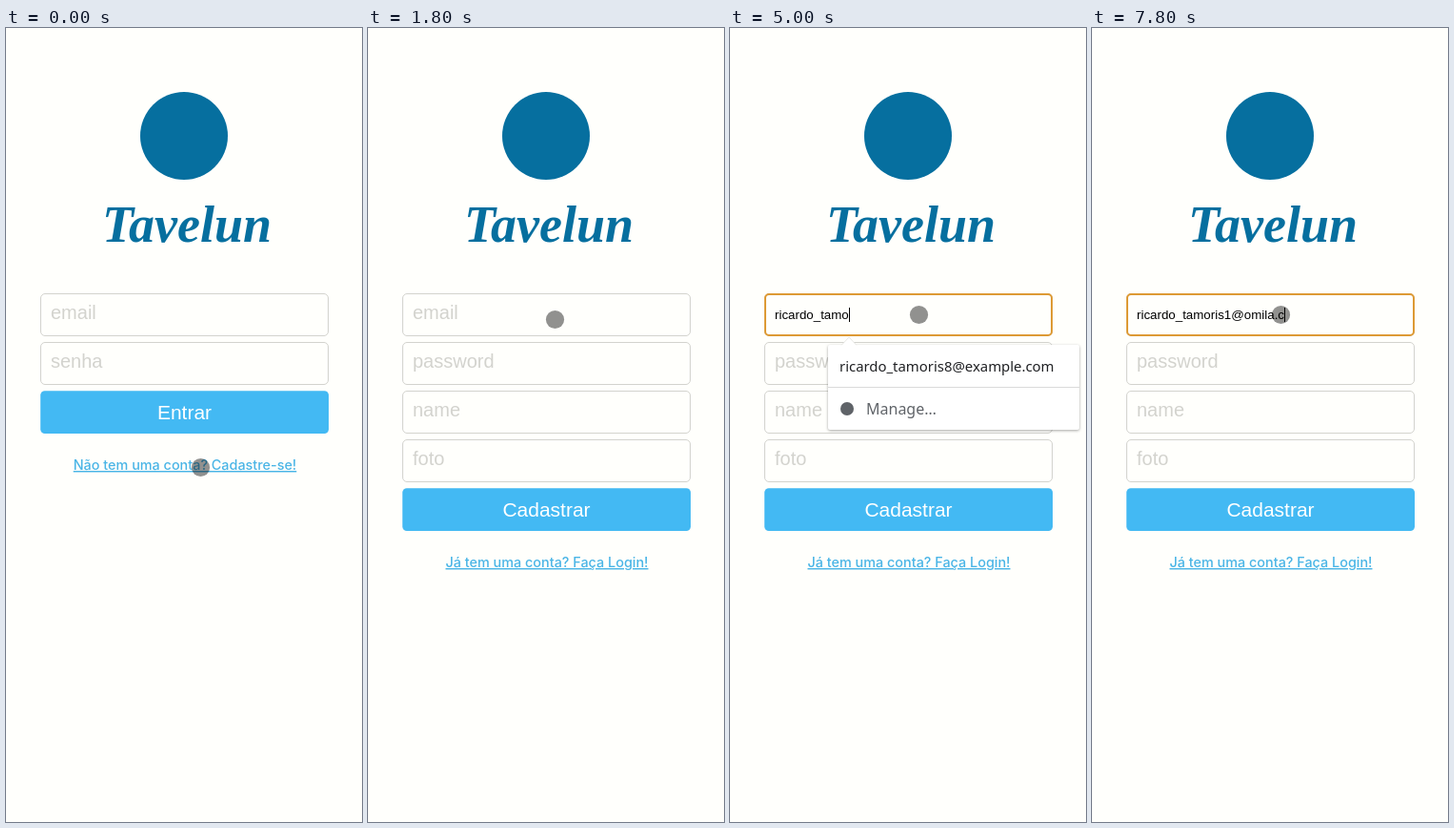
An HTML page for the animation above (8000 ms loop, 374 px wide and 832 px high).

```html
<!DOCTYPE html>
<html lang="pt-BR">
<head>
<meta charset="utf-8">
<style>
  html, body { margin: 0; width: 100%; height: 100%; overflow: hidden; background: #fffffc; }
  svg { display: block; width: 100%; height: 100%; }
  text { font-family: "Liberation Sans", Arial, sans-serif; }
  .brand { font: italic bold 54px "Liberation Serif", serif; fill: #066f9f; }
  .field rect { fill: #fffffc; stroke: #d3d3ce; }
  .field text, #hint { font-size: 20px; fill: #d3d3ce; }
  .button rect { fill: #43b9f3; }
  .button text { font-size: 21px; fill: #fff; }
  .link { font: 500 14.4px Inter, sans-serif; fill: #4ab5e6; text-decoration: underline; }
  .middle { text-anchor: middle; }
  #typed { font-size: 13.333px; fill: #000; white-space: pre; }
  #popup text { font-family: "Noto Sans", "Open Sans", sans-serif; }
  #popup > rect { filter: drop-shadow(0 1px 1.5px rgba(0, 0, 0, .35)); }
</style>
</head>
<body>
<svg viewBox="0 0 374 832">
  <circle cx="187" cy="113" r="46" fill="#066f9f"/>
  <text class="brand middle" x="190" y="224">Tavelun</text>

  <g id="login"></g>
  <g id="signup"></g>

  <g id="focus">
    <rect x="37" y="279" width="301" height="43" rx="4" fill="#fffffc" stroke="#dd9a35" stroke-width="2"/>
    <text id="hint" x="47" y="305">email</text>
    <text id="typed" x="47" y="305"></text>
    <rect id="caret" y="293" width="1" height="15"/>
  </g>

  <g id="popup">
    <rect x="103" y="332" width="264" height="89" rx="2" fill="#fff"/>
    <path d="M117 332.5L125 324L133 332.5" fill="#fff" stroke="#e2e2df" stroke-width=".8"/>
    <path d="M117.5 333H132.5" stroke="#fff" stroke-width="2"/>
    <path d="M103 376.5H367" stroke="#dadada"/>
    <text x="115" y="360" font-size="14.9" fill="#202124">ricardo_tamoris8@example.com</text>
    <circle cx="123" cy="399" r="7" fill="#5f6368"/>
    <text x="143" y="405" font-size="16" fill="#5f6368">Manage…</text>
  </g>

  <circle id="pointer" r="9.6" fill="#000" fill-opacity=".43"/>
  <g id="mover" transform="translate(198 300)" stroke="#fff" stroke-width=".6"></g>
</svg>

<script>
const LOOP = 8000, STEP = 100;
const SIGNUP_AT = 900, FOCUS_AT = 2200, POPUP_END = 6100, SHIFT_LENGTH = 300;
const $ = id => document.getElementById(id);
const show = (id, visible) => $(id).setAttribute('display', visible ? 'inline' : 'none');
const clamp = v => Math.min(1, Math.max(0, v));
const progress = (t, from, to) => from === to ? +(t >= from) : clamp((t - from) / (to - from));

// Each burst is typed at an even pace, its first key at `from` and its last at `to`.
const bursts = [
  { text: 'ricardo', from: 3000, to: 3600 },
  { text: '_', from: 4200, to: 4200 },
  { text: 'tamoris', from: 4600, to: 5400 },
  { text: '1', from: 6000, to: 6000 },
  { text: '@o', from: 6400, to: 6600 },
  { text: 'mila.c', from: 7300, to: 7800 }
];
const shiftPresses = [4100, 6200];

const origin = { x: 204.5, y: 460.5 };
const glides = [
  { from: 0, to: 400, x: 200, y: 461.5 },
  { from: 900, to: 1100, x: 197.5, y: 456.5 },
  { from: 1200, to: 1400, x: 179, y: 370.5 },
  { from: 1500, to: 1800, x: 196.5, y: 305.5 },
  { from: 2100, to: FOCUS_AT, x: 198.5, y: 300.5 }
];

function typedAt(t) {
  let text = '', lastKey = t;
  for (const burst of bursts.filter(b => t >= b.from)) {
    const p = progress(t, burst.from, burst.to);
    text += burst.text.slice(0, 1 + Math.floor(p * (burst.text.length - 1) + 1e-6));
    lastKey = Math.min(t, burst.to);
  }
  return { text, idle: t - lastKey };
}

function pointerAt(t) {
  return glides.reduce((pos, glide) => {
    const p = progress(t, glide.from, glide.to);
    return { x: pos.x + (glide.x - pos.x) * p, y: pos.y + (glide.y - pos.y) * p };
  }, origin);
}

function buildForm(id, labels, action, link) {
  const fields = labels.map((label, i) => `<g class="field" transform="translate(36 ${278 + 51 * i})">
    <rect x=".5" y=".5" width="302" height="44" rx="4.5"/><text x="11" y="27">${label}</text></g>`);
  const top = 278 + 51 * labels.length;
  $(id).innerHTML = `${fields.join('')}
    <g class="button"><rect x="36.2" y="${top + .2}" width="302.8" height="44.8" rx="4.6"/>
    <text class="middle" x="187.5" y="${top + 30}">${action}</text></g>
    <text class="link middle" x="188" y="${top + 83}">${link}</text>`;
}

function draw(t) {
  const shiftHeld = shiftPresses.some(at => t >= at && t < at + SHIFT_LENGTH);
  const { text, idle } = typedAt(t);

  show('login', t < SIGNUP_AT);
  show('signup', t >= SIGNUP_AT);
  show('focus', t >= FOCUS_AT);
  show('popup', t >= FOCUS_AT && t < POPUP_END);

  $('typed').textContent = text;
  show('hint', !text);
  show('caret', shiftHeld || idle % 1000 < 500);
  const width = text ? $('typed').getComputedTextLength() : 0;
  $('caret').setAttribute('x', Math.round(47 + width));

  const { x, y } = pointerAt(t);
  $('pointer').setAttribute('cx', x);
  $('pointer').setAttribute('cy', y);
  show('pointer', !shiftHeld);
  show('mover', shiftHeld);
}

const arrow = turn => `<path transform="rotate(${turn})" d="M-1 0V-4H-3.2L0-7.5L3.2-4H1V0"/>`;
$('mover').innerHTML = [0, 90, 180, 270].map(arrow).join('');
buildForm('login', ['email', 'senha'], 'Entrar', 'Não tem uma conta? Cadastre-se!');
buildForm('signup', ['email', 'password', 'name', 'foto'], 'Cadastrar', 'Já tem uma conta? Faça Login!');

const start = performance.now();
function frame() {
  const t = (performance.now() - start) % LOOP;
  draw(Math.floor(t / STEP) * STEP);
  requestAnimationFrame(frame);
}
frame();
</script>
</body>
</html>
```
